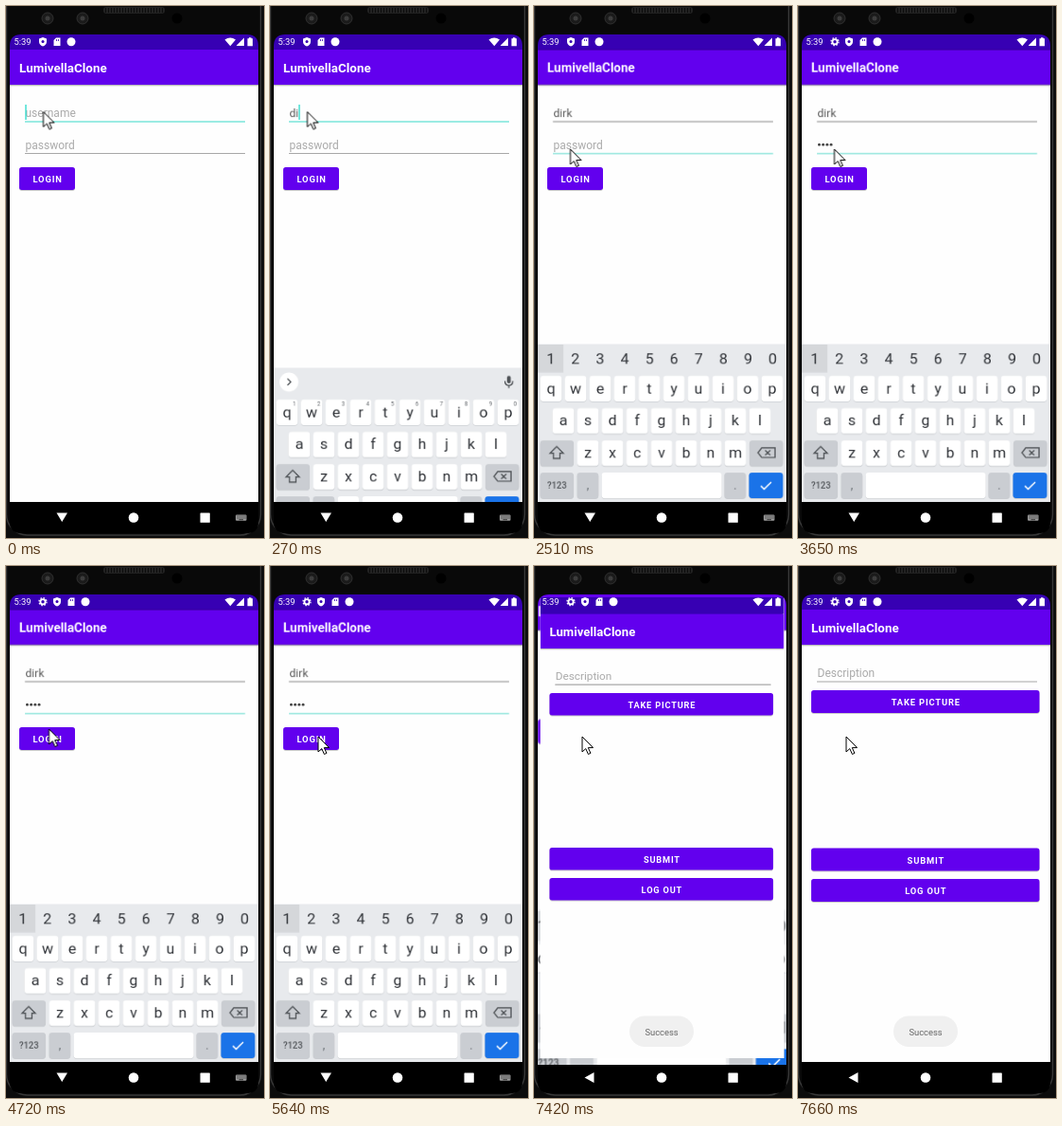
An HTML page that plays this animation: 273 px wide and 561 px high, repeating every 8000 ms.

```html
<!DOCTYPE html>
<html lang="en">
<head>
<meta charset="utf-8">
<title>Login demo</title>
<style>
html, body { margin: 0; width: 100%; height: 100%; overflow: hidden; background: #0c0c0c; }
svg { display: block; width: 273px; height: 561px; font-family: Roboto, "Noto Sans", sans-serif; }
.title { font-size: 13.4px; font-weight: 600; fill: #fff; }
.field { font-size: 12px; fill: #585858; }
.hint { font-size: 12px; fill: #aaa; }
.btn { font-size: 9.4px; font-weight: 700; letter-spacing: .84px; fill: #fff; text-anchor: middle; }
.key { font-size: 16px; fill: #303338; text-anchor: middle; }
.dim { font-size: 13px; fill: #6b7075; text-anchor: middle; }
.sup { font-size: 6px; fill: #5f6368; text-anchor: middle; }
.word { font-size: 12.3px; fill: #505458; text-anchor: middle; }
.mod { font-size: 9.4px; font-weight: 500; fill: #505458; text-anchor: middle; }
.icon { fill: none; stroke: #505458; stroke-width: 1.3; }
.line { stroke: #a8a8a8; stroke-width: 1.2; }
.caret { stroke: #14d6c5; stroke-width: 1.2; }
#app, #home { transform-origin: 136px 277px; }
</style>
</head>
<body>
<svg viewBox="0 0 273 561">
  <defs>
    <clipPath id="viewClip"><path d="M4 526V42Q4 30 16 30H255Q267 30 267 42V526Z"/></clipPath>
    <clipPath id="kbClip"><rect x="4" y="340" width="263" height="183"/></clipPath>
    <g id="page">
      <rect x="4" y="83" width="263" height="440" fill="#fefefe"/>
      <rect x="4" y="83" width="263" height="1" fill="#0004"/>
      <rect x="4" y="84" width="263" height="1" fill="#0001"/>
      <rect x="4" y="46" width="263" height="37" fill="#6200ee"/>
      <rect x="4" y="28" width="263" height="18" fill="#3700b3"/>
      <text class="title" x="14" y="70">LumivellaClone</text>
    </g>
  </defs>

  <!-- phone body -->
  <rect x=".5" y="-24" width="269" height="582" rx="22" fill="#090909" stroke="#383838" stroke-width="1.4"/>
  <rect x="103" y="1" width="65" height="7" rx="3" fill="#222"/>
  <path d="M105 4.5H166" stroke="#0c0c0c" stroke-width="5" stroke-dasharray="1 2"/>
  <g fill="#1b1b1b" stroke="#303030">
    <circle cx="44" cy="13" r="6"/><circle cx="81" cy="13" r="6"/>
  </g>
  <g fill="#3c3c3c"><circle cx="44" cy="13" r="2.5"/><circle cx="81" cy="13" r="2.5"/></g>
  <circle cx="181" cy="13" r="5.5" fill="#000"/>
  <path d="M4 42Q4 30 16 30H255Q267 30 267 42V544Q267 556 255 556H16Q4 556 4 544Z" fill="#000"/>

  <g clip-path="url(#viewClip)">
    <g id="app">
      <use href="#page"/>
      <path id="userLine" class="line" d="M20 122H253"/>
      <text id="userHint" class="hint" x="20.5" y="117">username</text>
      <text id="user1" class="field" x="20.5" y="117">di</text>
      <text id="user2" class="field" x="20.5" y="117">dirk</text>
      <path id="compose" d="M20.5 118.5H42" stroke="#707070"/>
      <path id="userCaret" class="caret" d="M0 104V120"/>
      <path id="passLine" class="line" d="M20 155.5H253"/>
      <text id="passHint" class="hint" x="20.5" y="150.5">password</text>
      <g id="dots" fill="#333"></g>
      <path id="passCaret" class="caret" d="M0 137.5V153.5"/>
      <g id="login"></g>
      <rect id="press" x="14" y="170" width="59" height="24" rx="2.7" fill="#fff"/>
      <g clip-path="url(#kbClip)"><g id="kb">
        <rect x="4" y="356.5" width="263" height="168" fill="#e8eaed"/>
        <g id="words">
          <rect id="pick" x="29" y="357" width="67.5" height="29.5" fill="#d5d7da"/>
          <path d="M97 364V380M172.5 364V380" stroke="#d0d3d6"/>
          <text class="word" x="62.5" y="376">dirk</text>
          <text class="word" x="134" y="376">Dirk</text>
          <text class="word" x="206" y="376">Kirk</text>
        </g>
        <g id="strip">
          <circle cx="20" cy="371.5" r="10" fill="#fff"/>
          <path class="icon" d="M18.5 368L22 371.5L18.5 375"/>
          <rect x="250.7" y="365" width="4" height="8" rx="2" fill="#505458"/>
          <path class="icon" d="M248.5 370.5Q248.5 375 252.7 375T256.9 370.5M252.7 375V378"/>
        </g>
        <g id="digits"><rect x="4" y="357" width="27" height="29.5" fill="#d5d7da"/></g>
        <g id="keys"></g>
        <g id="sups"></g>
        <g id="smile"></g>
        <g id="longSpace"></g>
        <path class="icon" d="M24 464.5L31 471.5H27.5V477H20.5V471.5H17Z"/>
        <path class="icon" d="M237 471L241 466H255V476H241ZM244.5 468.5L250 473.5M250 468.5L244.5 473.5"/>
        <g fill="none" stroke="#fff" stroke-width="1.5">
          <path id="enter" d="M251 501.5V506H240M243.5 502L239.5 506L243.5 510"/>
          <path id="check" d="M240 506L243.5 509.5L251 502"/>
        </g>
      </g></g>
    </g>

    <g id="home">
      <use href="#page"/>
      <text class="hint" x="20.5" y="117">Description</text>
      <path class="line" d="M20 122H253"/>
    </g>
  </g>

  <!-- status icons -->
  <g fill="#fff">
    <text x="8.5" y="41.3" font-size="9.4">5:39</text>
    <g id="gear" fill="none" stroke="#fff">
      <circle cx="39" cy="37.7" r="2.6" stroke-width="1.8"/>
      <circle cx="39" cy="37.7" r="4" stroke-width="1.3" stroke-dasharray="1.57 1.57"/>
    </g>
    <g id="notes">
      <path d="M39 33L43 34.5V37.5Q43 41 39 42.5Q35 41 35 37.5V34.5Z"/>
      <circle cx="39" cy="37.5" r="1.5" fill="#3700b3"/>
      <path d="M53 33.5H57.5V42H50.5V36Z"/>
      <path d="M53.5 35V37M55.5 35V37" stroke="#3700b3" stroke-width=".8"/>
      <circle cx="69" cy="37.7" r="4.5"/>
    </g>
    <path d="M231.5 35.5Q237.3 31.5 243 35.5L237.3 42.3Z"/>
    <path d="M244 42V41.5L252 33.5V42Z"/>
    <path d="M255.5 34.3H257V33.3H259.5V34.3H261V42.3H255.5Z"/>
  </g>

  <!-- navigation bar -->
  <g fill="#fff">
    <path id="down" d="M53.5 534.5H65L59.25 544Z"/>
    <path id="back" d="M63.5 534V545L53.5 539.5Z"/>
    <circle cx="135" cy="539.5" r="5.3"/>
    <rect x="205.5" y="534.5" width="10.3" height="10.3" rx=".6"/>
    <g id="switch">
      <rect x="243" y="536.5" width="11.5" height="6.3" rx="1" fill="#999"/>
      <path d="M244.5 538H254M244.5 540H254" stroke="#222" stroke-dasharray="1 1"/>
      <path d="M246.5 541.7H251" stroke="#222" stroke-width=".8"/>
    </g>
  </g>

  <g id="toast">
    <rect x="101" y="474.5" width="68" height="32.5" rx="16.2" fill="#f0f0f0"/>
    <text x="135" y="494.5" font-size="9.4" fill="#666" text-anchor="middle">Success</text>
  </g>

  <path id="pointer" d="M0 0V16L3.8 12.6L6.4 18.5L8.9 17.4L6.3 11.6H11.5Z" fill="#fff" stroke="#000"/>
</svg>

<script>
const LOOP = 8000;
const $ = id => document.getElementById(id);

function add(parent, tag, attrs, text = '') {
  const el = document.createElementNS('http://www.w3.org/2000/svg', tag);
  for (const name in attrs) el.setAttribute(name, attrs[name]);
  el.textContent = text;
  return parent.appendChild(el);
}
const label = (parent, cls, x, y, text) => add(parent, 'text', { class: cls, x, y }, text);

function key(parent, x, y, width, fill = '#fff') {
  const box = { x, width, height: 27, rx: 3.2 };
  add(parent, 'rect', { ...box, y: y + .8, fill: '#c8cbcf' });
  add(parent, 'rect', { ...box, y, fill });
}

function button(parent, x, y, width, text) {
  const box = { x, width, height: 24, rx: 2.7 };
  add(parent, 'rect', { ...box, y: y + 1, fill: '#0003' });
  add(parent, 'rect', { ...box, y, fill: '#6200ee' });
  label(parent, 'btn', x + width / 2 + .6, y + 16, text);
}

button($('login'), 14, 170, 59, 'LOGIN');
button($('home'), 14, 131, 241.5, 'TAKE PICTURE');
button($('home'), 14, 297.5, 241.5, 'SUBMIT');
button($('home'), 14, 330, 241.5, 'LOG OUT');

const keys = $('keys'), grey = '#cacdd2';
[['qwertyuiop', 18], ['asdfghjkl', 31], ['zxcvbnm', 57]].forEach(([row, left], r) => {
  [...row].forEach((ch, i) => {
    const x = left + 26 * i, y = 390 + 34 * r;
    key(keys, x - 11.3, y, 22.6);
    label(keys, 'key', x, y + 18.5, ch);
  });
});
[...'1234567890'].forEach((n, i) => {
  label($('digits'), 'key', 17.7 + 26.1 * i, 377.5, n);
  label($('sups'), 'sup', 25.5 + 26 * i, 397, n);
});
key(keys, 6.5, 458, 35.5, grey);
key(keys, 228, 458, 35.5, grey);
key(keys, 6.5, 492, 35.5, grey);
key(keys, 45.5, 492, 22.6, grey);
key(keys, 201.5, 492, 22.6, grey);
key(keys, 227.5, 492, 36, '#1a73e8');
label(keys, 'mod', 24.2, 509, '?123');
label(keys, 'dim', 56.8, 510, ',');
label(keys, 'dim', 212.8, 510, '.');

key($('smile'), 71.5, 492, 22.6);
key($('smile'), 97.5, 492, 101);
add($('smile'), 'circle', { class: 'icon', cx: 82.8, cy: 505.3, r: 5.8 });
add($('smile'), 'path', { class: 'icon', d: 'M79.5 506.5Q82.8 510.5 86 506.5M80 503.5H81.5M84 503.5H85.5' });
key($('longSpace'), 71.5, 492, 127);

[0, 1, 2, 3].forEach(i => add($('dots'), 'circle', { id: 'dot' + i, cx: 22.4 + 4.2 * i, cy: 146, r: 1.4 }));

// Stepped CSS keyframes, keyed by milliseconds.
const sheet = document.head.appendChild(document.createElement('style'));
function track(id, steps, css = v => `opacity:${v}`) {
  const frames = Object.entries(steps).map(([ms, v]) => `${ms / LOOP * 100}%{${css(v)}}`);
  sheet.append(`@keyframes ${id}{${frames.join('')}}#${id}{animation:${id} ${LOOP}ms step-end infinite}\n`);
}
const from = (id, ms) => track(id, { 0: 0, [ms]: 1 });
const until = (id, ms) => track(id, { 0: 1, [ms]: 0 });
const move = ([x, y]) => `transform:translate(${x}px,${y}px)`;
const caret = ([x, on]) => `opacity:${on};transform:translateX(${x}px)`;
const zoom = ([s, alpha]) => `opacity:${alpha};transform:scale(${s})`;
const stroke = color => `stroke:${color}`;

track('pointer', {
  0: [39.5, 111.5], 1080: [40, 130], 1210: [39, 148], 1360: [38.5, 151],
  4330: [42, 162], 4450: [45.5, 174], 4720: [45.5, 172], 4990: [51, 180]
}, move);

track('kb', { 0: [0, 175], 150: [0, 110], 270: [0, 25], 390: [0, 0] }, move);
until('userHint', 270);
track('user1', { 0: 0, 270: 1, 390: 0 });
from('user2', 390);
track('compose', { 0: 0, 540: 1, 1620: 0 });
track('userCaret', { 0: [21, 1], 270: [31, 1], 390: [43, 1], 1080: [43, 0] }, caret);
track('userLine', { 0: '#3ad9ca', 1620: '#a8a8a8' }, stroke);

track('words', { 0: 0, 540: 1, 1990: 0 });
track('pick', { 0: 0, 660: 1 });
until('strip', 2510);
from('digits', 2510);
until('sups', 2510);
until('smile', 2510);
from('longSpace', 2510);
until('enter', 2510);
from('check', 2510);

track('passLine', { 0: '#a8a8a8', 1620: '#90d8d0', 1740: '#74dfd3', 7150: '#4adacc' }, stroke);
until('passHint', 2660);
[2660, 2900, 3150, 3270].forEach((ms, i) => from('dot' + i, ms));
track('passCaret', {
  0: [21, 0], 1990: [21, 1], 2510: [21, 0], 2660: [25.5, 1], 2900: [29.7, 1],
  3150: [33.9, 1], 3270: [38, 1], 3650: [38, 0], 4180: [38, 1],
  4720: [38, 0], 5140: [38, 1], 5640: [38, 0], 7150: [37.5, 1]
}, caret);
track('press', { 0: 0, 5400: .12, 5520: .2, 5640: 0 });

from('gear', 3270);
track('notes', { 0: [0, 0], 3270: [15, 0] }, move);

track('app', { 0: [1, 1], 7150: [1.003, 1], 7270: [1.0085, 1], 7420: [1.08, 1], 7660: [1, 0] }, zoom);
track('home', { 0: [1, 0], 7420: [.98, 1], 7540: [.995, 1], 7660: [1, 1] }, zoom);
track('toast', { 0: 0, 7150: .3, 7270: .8, 7420: 1 });
until('down', 7420);
from('back', 7420);
until('switch', 7150);
</script>
</body>
</html>
```
